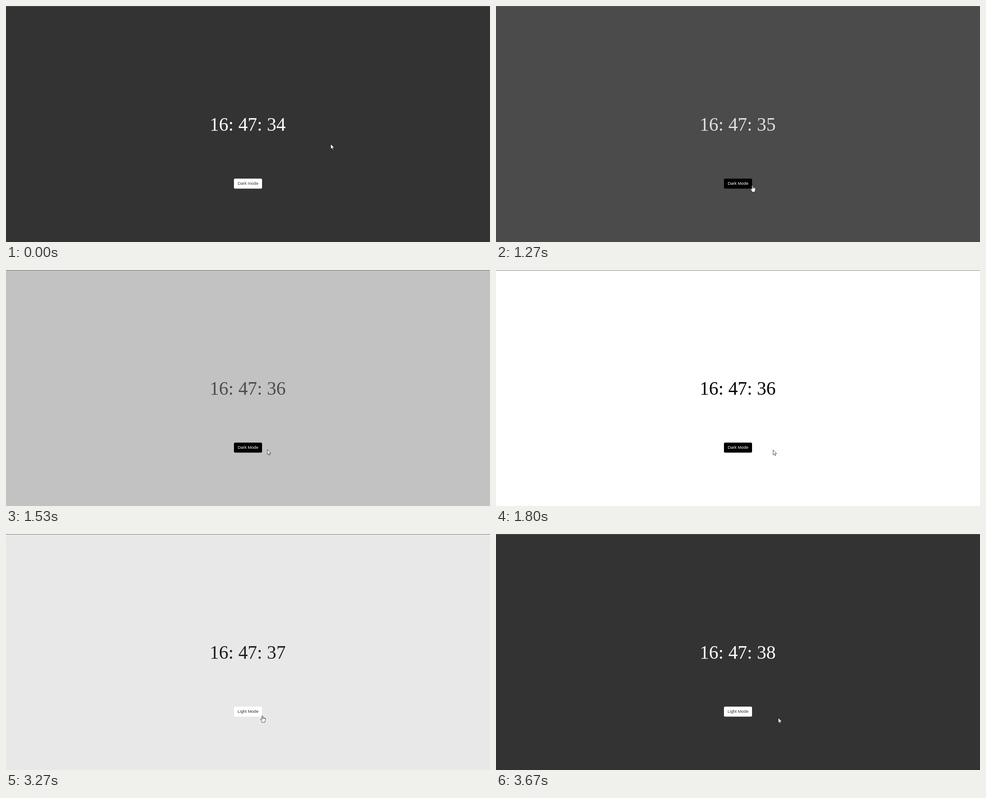
These frames come from a looping animation (1068 by 524 pixels, 4.39 s). An HTML page:

```html
<!DOCTYPE html>
<html lang="en">
<head>
<meta charset="utf-8">
<title>Clock with dark mode</title>
<style>
  html, body { margin: 0; width: 100%; height: 100%; overflow: hidden; background: #333; }
  svg { display: block; width: 1068px; height: 524px; }
  #clock { font: 41.4px "Liberation Serif", "Times New Roman", serif; }
  #label { font: 9.35px "Liberation Sans", Arial, sans-serif; text-anchor: middle; }
  .cursor path { fill: #fff; stroke: #111; stroke-width: 1.1; stroke-linejoin: round; }
  .cursor .lines { fill: none; }
</style>
</head>
<body>
<svg viewBox="0 0 1068 524">
  <rect id="page" width="1068" height="524"/>
  <rect width="1068" height="1" fill="#636363" fill-opacity=".87"/>
  <text id="clock" x="449.4" y="277" xml:space="preserve"></text>
  <rect id="button" x="503" y="383.2" width="62" height="22.3" rx="2.7"/>
  <text id="label" x="534" y="397.3"></text>
  <g class="cursor" id="arrow">
    <path d="M0 0V16.6L3.8 13L6.3 18.7L8.7 17.6L6.3 12H11.6Z"/>
  </g>
  <g class="cursor" id="hand">
    <path d="M-1.5 1.5Q-1.5 0 0 0Q1.5 0 1.5 1.5V6C2 5.2 4.5 5.4 4.5 7C5.2 6 7.5 6.3 7.5 8C8.5 7.2 10.3 7.6 10.3 9.5V14L8.5 18V21.5H-1.5V18.5L-5.5 13C-6.8 11 -5 9.8 -3.5 11L-1.5 13Z"/>
    <path class="lines" d="M1.5 6V10.5M4.5 7V10.5M7.5 8V11"/>
  </g>
</svg>
<script>
const LOOP = 4390, FADE = 640;
const [page, clock, button, label, arrow, hand] =
  ['page', 'clock', 'button', 'label', 'arrow', 'hand'].map(id => document.getElementById(id));

const linear = x => x;
const easeIn = x => x ** 1.65;
const easeOut = x => 1 - (1 - x) ** 3;
const easeInOut = x => (1 - Math.cos(Math.PI * x)) / 2;

const home = [716.5, 306.5];
const moves = [
  { from: 70, till: 800, to: [565.6, 398.4], ease: easeOut },
  { from: 1330, till: 1800, to: [611.5, 399.5], ease: easeIn },
  { from: 2000, till: 2600, to: [565.6, 403.5], ease: linear },
  { from: 3330, till: 3670, to: [623, 408.3], ease: easeIn }
];

const progress = (t, from, till) => Math.min(1, Math.max(0, (t - from) / (till - from)));
const within = (t, from, till) => t >= from && t < till;
const grey = v => `rgb(${Array(3).fill(Math.round(v))})`;

function pointer(t) {
  return moves.reduce((pos, { from, till, to, ease }) => {
    const p = ease(progress(t, from, till));
    return pos.map((v, i) => v + (to[i] - v) * p);
  }, home);
}

// the first faint step and the last one are not shown
function fade(t, start, end) {
  if (t < start + 100) return 0;
  return t >= end ? 1 : easeInOut(progress(t, start, start + FADE));
}

function render(now) {
  // the picture advances 15 times a second
  const t = Math.round(Math.floor((now + 4) * 0.015) * 20 / 3) * 10;

  const light = fade(t, 1126, 1730) - fade(t, 3130, 3670);
  page.setAttribute('fill', grey(51 + 204 * light));
  clock.setAttribute('fill', grey(255 * (1 - light)));
  clock.textContent = '16: 47: ' + (34 + Math.floor((t + 670) / 1000));

  const black = within(t, 1130, 3130);
  button.setAttribute('fill', black ? '#000' : '#fff');
  label.setAttribute('fill', black ? '#fff' : '#333');
  label.textContent = t < 1130 ? 'Dark mode' : black ? 'Dark Mode' : 'Light Mode';

  const [x, y] = pointer(t);
  const over = within(t, 730, 1400) || within(t, 2670, 3400);
  for (const c of [arrow, hand]) c.setAttribute('transform', `translate(${x} ${y}) scale(.68)`);
  arrow.style.display = over ? 'none' : '';
  hand.style.display = over ? '' : 'none';
}

const begin = performance.now();
function tick() {
  render((performance.now() - begin) % LOOP);
  requestAnimationFrame(tick);
}
tick();
</script>
</body>
</html>
```
